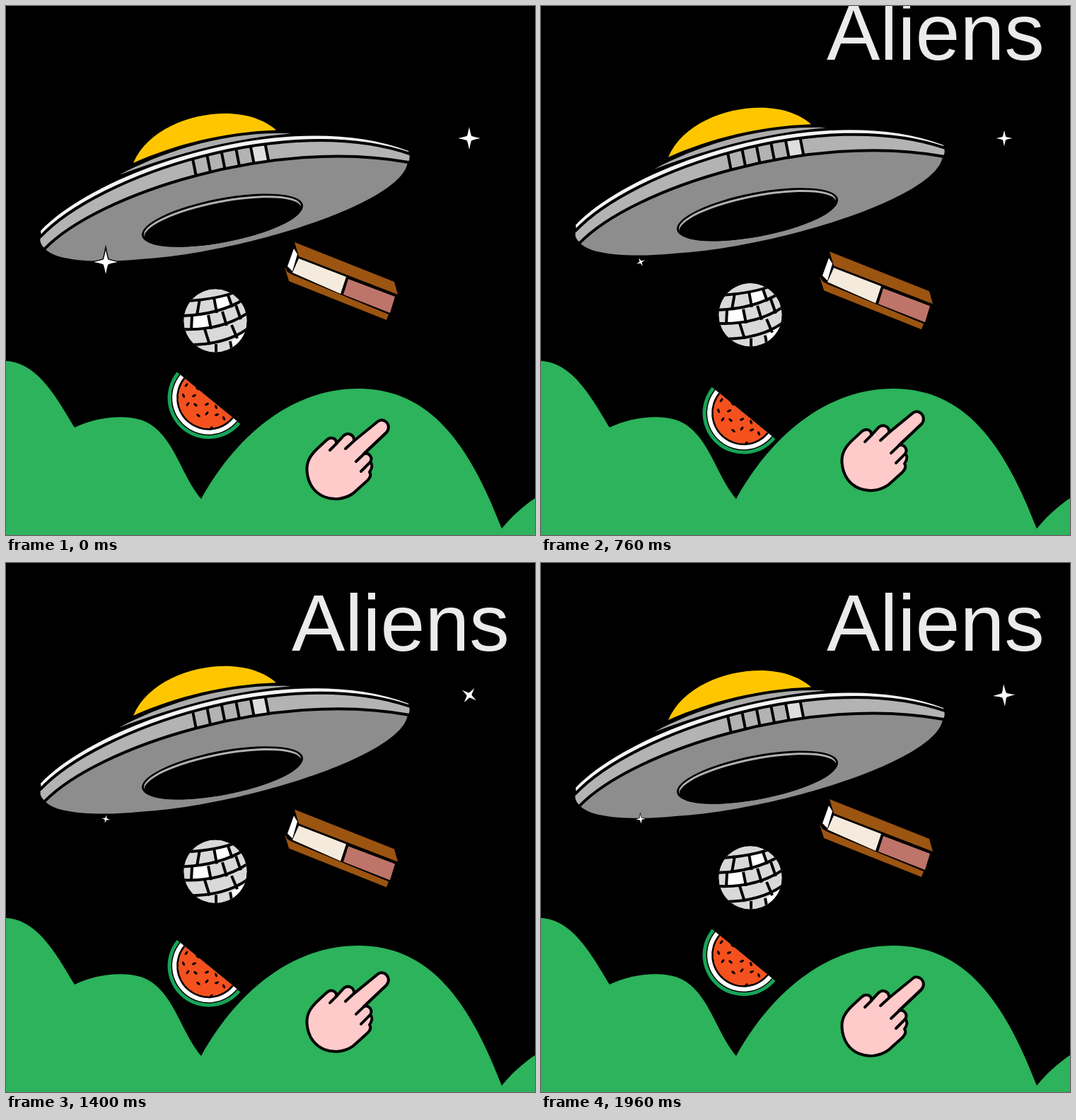
Recreate the animation shown at these times as an HTML page with a canvas. Size 748x748 px, loop 2000 ms.

```html
<!DOCTYPE html>
<html lang="en">
<head>
<meta charset="utf-8">
<title>Aliens</title>
<style>
html, body { margin: 0; width: 100%; height: 100%; overflow: hidden; background: #000; }
canvas { display: block; width: 100vw; height: 100vh; }
</style>
</head>
<body>
<canvas id="stage" width="748" height="748"></canvas>
<script>
const ctx = document.getElementById('stage').getContext('2d');
const LOOP = 2000, STEP = 40;
const TAU = Math.PI * 2;

const fill = (d, color) => { ctx.fillStyle = color; ctx.fill(new Path2D(d)); };
const line = (d, width = 4, color = '#000') => {
  ctx.strokeStyle = color;
  ctx.lineWidth = width;
  ctx.stroke(new Path2D(d));
};
const ellipse = (x, y, rx, ry, angle, color) => {
  ctx.fillStyle = color;
  ctx.beginPath();
  ctx.ellipse(x, y, rx, ry, angle, 0, TAU);
  ctx.fill();
};
const at = (x, y, draw) => {
  ctx.save();
  ctx.translate(x, y);
  draw();
  ctx.restore();
};

const clamp = v => Math.min(1, Math.max(0, v));
const ease = p => (1 - Math.cos(Math.PI * clamp(p))) / 2;
// Out and back once per loop, reaching 1 at the turning time.
const swing = (t, turn) => t < turn ? ease(t / turn) : 1 - ease((t - turn) / (LOOP - turn));
// Linear interpolation through [time, value] keys.
function track(t, keys) {
  const i = Math.max(1, keys.findIndex(k => k[0] > t));
  const [t0, a] = keys[i - 1], [t1, b] = keys[i];
  return a + (b - a) * (t - t0) / (t1 - t0);
}

function hills() {
  fill('M0 502C45 504 72 555 97 596C125 582 165 577 190 585C236 600 245 660 276 697' +
    'C330 600 410 541 498 541C600 541 655 620 701 739C715 722 730 708 748 696V748H0Z', '#2cb35c');
}

function ufo() {
  fill('M180 222C200 175 260 152 310 152C340 152 366 161 382 175.5C310 178 240 195 180 222Z', '#ffc600');
  fill('M160 239C220 207 310 176 403 180.5C330 186 250 205 160 239Z', '#acacac');
  // Highlight, rim and underside
  fill('M49 318C130 232 400 141 569 205L570 209C400 150 130 239 50 325Z', '#f4f4f4');
  fill('M50 325C130 239 400 150 570 209Q572 217 568 221C380 186 130 265 55 343Q45 334 50 325Z', '#b3b3b3');
  fill('M55 343C70 361 130 364 190 358C330 350 560 280 568 221C380 186 130 265 55 343Z', '#8d8d8d');
  fill('M346 199L366 195L371 218L350 222Z', '#dedede');
  line('M48 327C130 239 400 150 571 209');
  line('M54 344C130 265 380 186 569 221');
  for (let i = 0; i < 6; i++) {
    const x = 264 + i * 20.5, y = 216 - i * 4.2;
    line(`M${x} ${y}l4.5 23`);
  }
  const tilt = -0.19;
  ellipse(306, 303, 116, 31, tilt, '#000');
  ellipse(306, 303, 113, 28, tilt, '#b3b3b3');
  ellipse(306.5, 306, 113, 28, tilt, '#000');
}

function ball() {
  ctx.beginPath();
  ctx.arc(296, 445, 44.7, 0, TAU);
  ctx.clip();
  ellipse(296, 445, 45, 45, 0, '#d9d9d9');
  fill('M294 412L314 409L320 424L298 434Z', '#fff');
  fill('M263 438L286 437L290 458L262 457Z', '#fff');
  fill('M317 475L340 459L340 490L319 490Z', '#fff');
  line('M258 417Q300 414 326 404');
  line('M248 438Q300 437 338 414');
  line('M248 457Q305 460 345 432');
  line('M258 479Q310 479 342 456');
  line('M274 414L270 437M294 412L298 434M314 409L320 426' +
    'M263 438L262 457M286 437L290 457M306 432L312 452M325 423L332 443' +
    'M281 457L288 479M319 451L327 470M297 478V492M317 474L320 490');
}

function book() {
  const brown = '#9c5411';
  fill('M408 334L549 390L554 408L414 354Z', brown);
  fill('M394 369L398 376L405 380L541 436L538 444L400 389Z', brown);
  fill('M407 343L412 351L405 375L398 368Z', '#fff');
  fill('M414 357L481 383L473 407L405 377Z', '#f5ebdd');
  fill('M484 386L550 411L543 434L477 408Z', '#bf7469');
}

const seeds = [[255, 536], [271, 541], [266, 551], [251, 551], [257, 563], [268, 564], [284, 563],
  [297, 567], [284, 576], [272, 579], [298, 578], [308, 583], [290, 597]];

function melon() {
  at(287.5, 553, () => {
    ctx.rotate(0.686);
    const slice = (r, color) => fill(`M${-r} 1.5H${r}A${r} ${r} 0 0 1 ${-r} 1.5Z`, color);
    slice(58, '#17a458');
    slice(53, '#000');
    slice(51.5, '#fff');
    slice(45.5, '#000');
    slice(43, '#f4511e');
  });
  seeds.forEach(([x, y], i) => ellipse(x, y, 3.2, 1.6, [-0.9, 0.7, -0.4, 1.2][i % 4], '#000'));
}

function hand() {
  const shape = 'M425.5 657C425 644 430 636 439 627L453 614C459 608 468 611 467 619' +
    'L477 608C483 602 493 606 492 615L525 588C533 580 547 592 538 603L506 633' +
    'C514 631 519 639 515 645C519 649 517 655 514 659C517 663 515 667 511 671' +
    'L491 689C467 706 428 696 425.5 657Z';
  fill(shape, '#ffcaca');
  line(shape);
  line('M467 619L458 628M492 615L480 626M538 603L495 644M515 645L502 658');
}

function star(x, y, r, degrees, edge) {
  at(x, y, () => {
    ctx.rotate(degrees * TAU / 360);
    const k = r * 0.2;
    const d = `M0 ${-r}Q${k * .7} ${-k * 1.5} ${k} ${-k}Q${k * 1.5} ${-k * .7} ${r} 0` +
      `Q${k * 1.5} ${k * .7} ${k} ${k}Q${k * .7} ${k * 1.5} 0 ${r}` +
      `Q${-k * .7} ${k * 1.5} ${-k} ${k}Q${-k * 1.5} ${k * .7} ${-r} 0` +
      `Q${-k * 1.5} ${-k * .7} ${-k} ${-k}Q${-k * .7} ${-k * 1.5} 0 ${-r}Z`;
    if (edge) line(d, edge);
    fill(d, '#fff');
  });
}

function title(t) {
  ctx.font = '113px "Liberation Sans", Arial, sans-serif';
  ctx.fillStyle = '#ebebeb';
  ctx.fillText('Aliens', 404, 124 - 140 * (1 - ease((t - 400) / 600)));
}

function draw(t) {
  ctx.fillStyle = '#000';
  ctx.fillRect(0, 0, 748, 748);
  ctx.lineJoin = 'round';
  ctx.lineCap = 'butt';
  hills();
  at(0, -9.6 * swing(t, 1000), ufo);
  at(0, 18 * swing(t, 1150), book);
  at(0, -11 * swing(t, 1140), ball);
  at(0, 24.3 * swing(t, 980), melon);
  ctx.lineCap = 'round';
  at(0, -12 * swing(t, 820), hand);
  ctx.lineJoin = 'miter';
  star(655, 187, track(t, [[0, 16], [1000, 10], [LOOP, 16]]), clamp((t - 1000) / 1000) * 90, 0);
  const size = track(t, [[0, 17], [440, 11], [780, 6], [1560, 5.8], [LOOP, 7]]);
  const turn = track(t, [[0, 0], [440, 45], [760, 65], [1120, 65], [LOOP, 180]]);
  star(141, 362, size, turn, size * 0.18);
  title(t);
}

const start = performance.now();
function tick() {
  const t = (performance.now() - start) % LOOP;
  draw(Math.floor(t / STEP) * STEP);
  requestAnimationFrame(tick);
}
tick();
</script>
</body>
</html>
```
